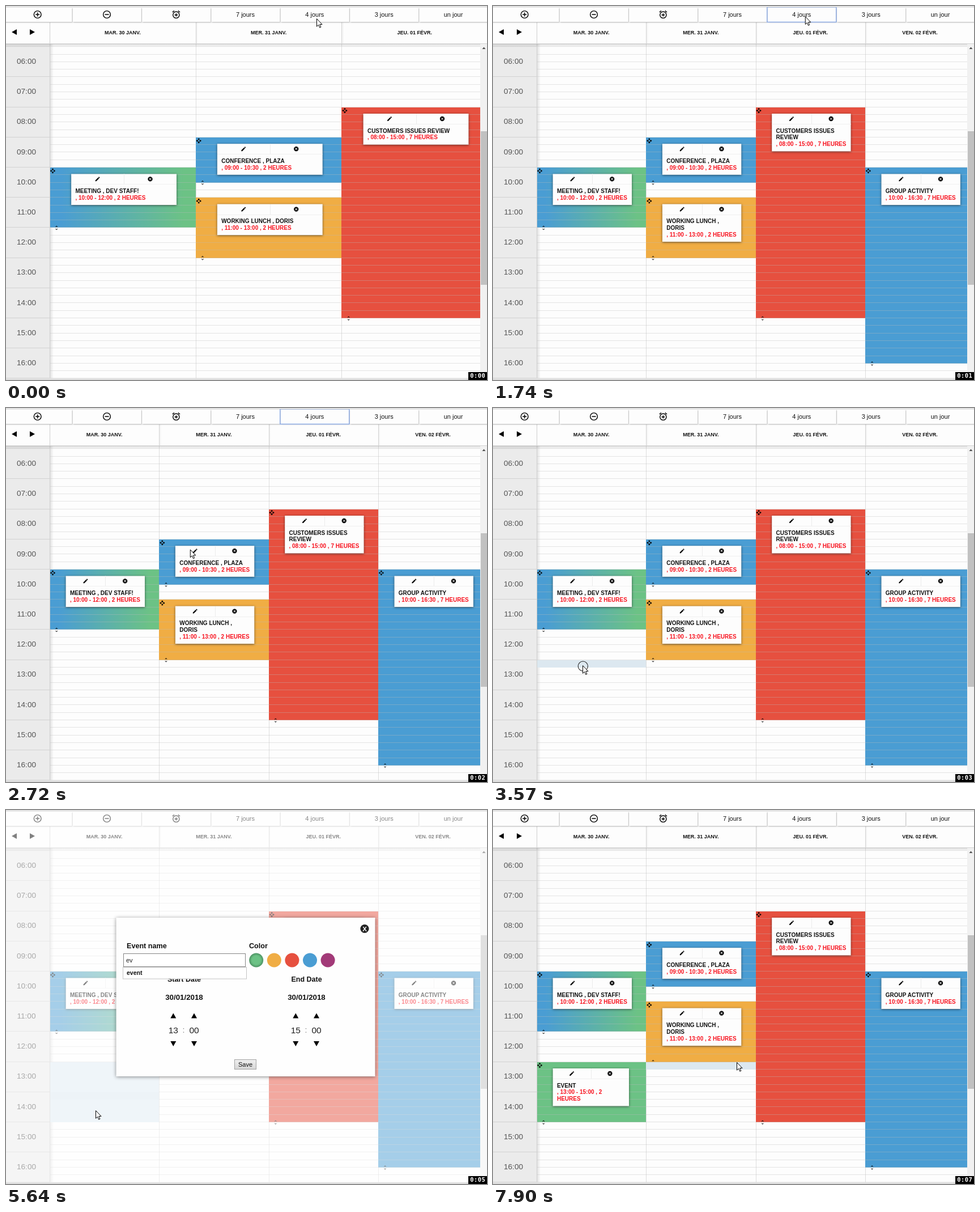
An HTML page for the animation above (7990 ms loop, 849 px wide and 660 px high).

```html
<!DOCTYPE html>
<html lang="fr">
<head>
<meta charset="utf-8">
<title>Agenda</title>
<style>
  html, body { margin: 0; width: 100%; height: 100%; overflow: hidden; background: #fdfdfd; }
  svg { display: block; width: 849px; height: 660px; font-family: "Liberation Sans", Arial, sans-serif; }
  text { white-space: pre; }
  .crisp { shape-rendering: crispEdges; }
  .b { font-weight: bold; }
  .mid { text-anchor: middle; }
  .card { filter: drop-shadow(0 1px 2px rgba(0, 0, 0, .55)); }
  .panel { filter: drop-shadow(0 1px 3px rgba(0, 0, 0, .45)); }
  .btn { filter: drop-shadow(1px 1px 1px rgba(0, 0, 0, .3)); }
  .late, #four, .wide #three { display: none; }
  .wide #four { display: inline; }
  .saved .late { display: inline; }
</style>
</head>
<body>
<svg id="stage" viewBox="0 0 849 660" xmlns="http://www.w3.org/2000/svg">
  <defs>
    <linearGradient id="mix"><stop offset=".08" stop-color="#4a9dd3"/><stop offset=".92" stop-color="#6cc285"/></linearGradient>
    <linearGradient id="key" x2="0" y2="1"><stop stop-color="#f0f0f0"/><stop offset="1" stop-color="#d6d6d6"/></linearGradient>
    <linearGradient id="edge"><stop stop-color="#000" stop-opacity=".12"/><stop offset="1" stop-color="#000" stop-opacity="0"/></linearGradient>
    <linearGradient id="under" x2="0" y2="1"><stop stop-color="#000" stop-opacity=".14"/><stop offset="1" stop-color="#000" stop-opacity="0"/></linearGradient>
    <radialGradient id="dot"><stop offset=".6" stop-color="#6cc285"/><stop offset="1" stop-color="#4c9263"/></radialGradient>
    <clipPath id="view"><rect y="67" width="837" height="590"/></clipPath>
  </defs>
</svg>
<script>
const LOOP = 7990, LEFT = 77, WIDTH = 773.2, TOP = 72.2, HOUR = 53.2, ROW = HOUR / 4;
const BLUE = '#4a9dd3', RED = '#e6503f', ORANGE = '#f0ad44', GREEN = '#6cc285';
const stage = document.getElementById('stage');
const yAt = hour => TOP + (hour - 6) * HOUR;

const rect = (x, y, w, h, fill, more = '') =>
  `<rect x="${x}" y="${y}" width="${w}" height="${h}" fill="${fill}" ${more}/>`;
const flat = (x, y, w, h, fill) => rect(x, y, w, h, fill, 'class="crisp"');
// One-pixel row that always lands on whole pixels
const rule = (x, y, w, fill) => flat(x, Math.round(y), w, 1, fill);
const text = (x, y, s, size, cls = '', fill = '#000', more = '') =>
  `<text x="${x}" y="${y}" font-size="${size}" class="${cls}" fill="${fill}" ${more}>${s}</text>`;
const poly = (points, fill = '#000') => `<polygon points="${points}" fill="${fill}"/>`;

const ICONS = {
  move: 'M10 9h4V6h3l-5-5-5 5h3zM9 10H6V7l-5 5 5 5v-3h3zM23 12l-5-5v3h-3v4h3v3zM14 15h-4v3H7l5 5 5-5h-3z',
  size: 'M12 5.8L15.2 9l1.4-1.4L12 3 7.4 7.6 8.8 9zM12 18.2L8.8 15l-1.4 1.4L12 21l4.6-4.6L15.2 15z',
  edit: 'M3 17.2V21h3.8L17.8 9.9l-3.7-3.7zM20.7 7c.4-.4.4-1 0-1.4l-2.3-2.3c-.4-.4-1-.4-1.4 0l-1.9 1.8 3.8 3.8z',
  cancel: 'M12 2a10 10 0 100 20 10 10 0 100-20zM17 15.6L15.6 17 12 13.4 8.4 17 7 15.6l3.6-3.6L7 8.4 8.4 7l3.6 3.6L15.6 7 17 8.4 13.4 12z',
  minus: 'M12 2a10 10 0 100 20 10 10 0 100-20zm0 2a8 8 0 110 16 8 8 0 110-16zM7 11h10v2H7z',
  plus: 'M12 2a10 10 0 100 20 10 10 0 100-20zm0 2a8 8 0 110 16 8 8 0 110-16zM7 11h4V7h2v4h4v2h-4v4h-2v-4H7z',
  alarm: 'M7.9 3.4L6.6 1.9 2 5.7l1.3 1.5zM22 5.7l-4.6-3.8-1.3 1.5 4.6 3.8zM12 4a9 9 0 100 18 9 9 0 100-18zm0 2a7 7 0 110 14 7 7 0 110-14zM8 12h3V9h2v3h3v2h-3v3h-2v-3H8z'
};
const icon = (name, x, y, size) =>
  `<path d="${ICONS[name]}" fill-rule="evenodd" transform="translate(${x - size / 2} ${y - size / 2}) scale(${size / 24})"/>`;

const events = [
  { col: 0, from: 10, to: 12, fill: 'url(#mix)', title: ['MEETING , DEV STAFF!'], when: [', 10:00 - 12:00 , 2 HEURES'] },
  { col: 1, from: 9, to: 10.5, fill: BLUE, title: ['CONFERENCE , PLAZA'], when: [', 09:00 - 10:30 , 2 HEURES'] },
  { col: 1, from: 11, to: 13, fill: ORANGE, title: ['WORKING LUNCH ,', 'DORIS'], when: [', 11:00 - 13:00 , 2 HEURES'] },
  { col: 2, from: 8, to: 15, fill: RED, title: ['CUSTOMERS ISSUES', 'REVIEW'], when: [', 08:00 - 15:00 , 7 HEURES'] },
  { col: 3, from: 10, to: 16.5, fill: BLUE, title: ['GROUP ACTIVITY'], when: [', 10:00 - 16:30 , 7 HEURES'] },
  { col: 0, from: 13, to: 15, fill: GREEN, title: ['EVENT'], when: [', 13:00 - 15:00 , 2', 'HEURES'], late: true }
];
const dayNames = ['MAR. 30 JANV.', 'MER. 31 JANV.', 'JEU. 01 FÉVR.', 'VEN. 02 FÉVR.'];

function card(e, x, y, colW, days) {
  const title = days === 3 ? [e.title.join(' ')] : e.title;
  const lines = [...title, ...e.when];
  const w = colW * .721 - (e.late ? 5 : 0), h = 31 + lines.length * 11.8;
  const cx = x + colW * .148, cy = y + 11.4;
  let s = rect(cx, cy, w, h, '#fdfdfd', 'class="card"');
  s += rule(cx, cy + 18, w, '#f0f0f0') + flat(cx + w / 2, cy, 1, 18, '#ececec');
  s += icon('edit', cx + w / 4, cy + 9, 10.5) + icon('cancel', cx + w * .75, cy + 9, 10);
  lines.forEach((line, i) => {
    s += text(cx + 7.3, cy + 33.5 + i * 11.8, line, 10, 'b', i < title.length ? '#111' : '#f8131f');
  });
  return s;
}

function calendar(id, days) {
  const w = WIDTH / days, shown = events.filter(e => e.col < days && !(e.late && days === 3));
  let head = '', cols = '', blocks = '', lines = '', tops = '';
  for (let d = 0; d < days; d++) {
    const x = LEFT + d * w;
    head += text(x + w / 2, 50, dayNames[d], 9, 'b mid', '#111');
    if (d) {
      head += flat(x, 29, 1, 37, '#d4d4d4') + rect(x + 1, 29, 3, 37, 'url(#edge)', 'opacity=".5"');
      cols += flat(x, 67, 1, 590, '#dedede');
    }
  }
  for (let y = TOP; y < 659; y += ROW) lines += rule(LEFT, y - 1, 760, 'rgba(186,186,186,.38)');
  for (const e of shown) {
    const x = LEFT + e.col * w, y = yAt(e.from), bottom = yAt(e.to), cls = e.late ? 'late' : '';
    blocks += `<g class="${cls}">${flat(x, y, w, bottom - y, e.fill)}</g>`;
    tops += `<g class="${cls}">${icon('move', x + 5.5, y + 6, 10)}${icon('size', x + 12.2, bottom + .2, 10)}${card(e, x, y, w, days)}</g>`;
  }
  return `<g id="${id}">${head}<g clip-path="url(#view)">${cols}${blocks}${lines}${tops}</g></g>`;
}

function frame() {
  let s = flat(0, 0, 849, 660, '#fdfdfd');
  s += flat(0, 67, 77, 590, '#ebebeb') + rect(77, 67, 7, 590, 'url(#edge)');
  for (let h = 6; h < 18; h++) s += rule(0, yAt(h) - 1, 77, '#d2d2d2');
  for (let h = 6; h < 17; h++) s += text(36, yAt(h) + 29.8, String(h).padStart(2, '0') + ':00', 13.6, 'mid', '#555');
  return s + poly('10,46 19,41 19,51') + poly('51,46 42,41 42,51');
}

function toolbar() {
  const labels = ['plus', 'minus', 'alarm', '7 jours', '4 jours', '3 jours', 'un jour'];
  let s = '';
  labels.forEach((label, i) => {
    const cx = 55.5 + i * 122.33;
    s += rect(cx - 60, 3, 121, 25, '#fdfdfd', 'class="btn"');
    s += i < 3 ? icon(label, cx + .2, 15, 17) : text(cx, 19, label, 11, 'mid', '#111');
  });
  return s;
}

function chrome() {
  return flat(77, 29, 1, 628, '#cfcfcf') + flat(0, 66, 849, 1, '#d2d2d2') + rect(0, 67, 837, 5, 'url(#under)') +
    flat(837, 67, 12, 590, '#f1f1f1') + flat(838, 221, 11, 271, '#c1c1c1') + poly('840.5,76 846.5,76 843.5,72.5', '#505050');
}

function timePick(cx, label, hour) {
  let s = text(cx, 302.5, label, 12.5, 'b mid', '#111') + text(cx, 335, '30/01/2018', 13.3, 'b mid', '#111');
  [[cx - 19.2, hour], [cx + 17.5, '00']].forEach(([x, n]) => {
    s += poly(`${x - 5},367.5 ${x + 5},367.5 ${x},358.5`) + poly(`${x - 5},408 ${x + 5},408 ${x},417`);
    s += text(x, 394, n, 15.5, 'mid', '#222');
  });
  return s + text(cx - 1, 393, ':', 14, 'mid', '#888');
}

function dialog() {
  let s = rect(194.5, 190, 457, 280, '#fefefe', 'class="panel"');
  s += '<circle cx="633" cy="209.5" r="7.6" fill="#222"/>' + text(633, 213.6, 'X', 11.5, 'b mid', '#fff');
  s += text(213, 243.5, 'Event name', 12.6, 'b', '#111') + text(429, 243.5, 'Color', 12.6, 'b', '#111');
  ['url(#dot)', ORANGE, RED, BLUE, '#a23a78'].forEach((c, i) => {
    s += `<circle cx="${441.7 + i * 31.6}" cy="265" r="12.5" fill="${c}"/>`;
  });
  s += timePick(314.5, 'Start Date', 13) + timePick(530.5, 'End Date', 15);
  s += rect(207.5, 253.5, 215, 23, '#fff', 'stroke="#858585"');
  s += text(212, 269, '', 11, '', '#222', 'id="typed"') + rect(0, 258, 1, 13, '#000', 'id="caret" class="crisp"');
  s += `<g id="hint">${rect(206.5, 277.5, 218, 20.5, '#fff', 'stroke="#c4c4c4"')}${text(213, 291, 'event', 10.5, 'b', '#111')}</g>`;
  return s + rect(403.5, 440.5, 38, 17, 'url(#key)', 'stroke="#a3a3a3"') + text(422.5, 452.8, 'Save', 11, 'mid', '#111');
}

stage.innerHTML += frame() + calendar('three', 3) + calendar('four', 4) +
  rect(0, 0, WIDTH / 4, 0, '#dfebf4', 'id="cells" class="crisp"') +
  rect(LEFT, yAt(14), WIDTH / 4, ROW, '#dbe8f0', 'id="shade" class="crisp"') +
  chrome() + toolbar() + rect(483.8, 1.8, 122, 26.6, 'none', 'id="focus" stroke="#8fade6" stroke-width="1.5"') +
  rect(0, 2, 849, 655.5, '#fff', 'id="veil"') +
  flat(0, 1, 849, 1, '#c4c4c4') + flat(0, 658, 849, 1, '#b5b5b5') +
  `<g id="dialog">${dialog()}</g>` +
  '<circle id="ring" r="8.6" fill="none" stroke="#222" stroke-width="1.1"/>' +
  '<path id="arrow" d="M.5 .5V14.2L3.6 11.3 5.7 16.2 7.8 15.3 5.8 10.5H10Z" fill="#fff" stroke="#000" stroke-width="1"/>' +
  flat(816, 646, 33, 14, '#000') +
  text(832.8, 656.3, '', 10.5, 'b mid', '#fff', 'id="clock" font-family="DejaVu Sans Mono, monospace" letter-spacing=".5"');

// Pointer path: time, x, y
const path = [
  [0, 548, 22], [400, 548, 22], [900, 551, 18], [1740, 551, 18], [2150, 465, 74], [2320, 449, 112],
  [2600, 372, 195], [2900, 255, 330], [3210, 158, 447], [3300, 158, 449], [3380, 158, 454], [3570, 158, 454],
  [4310, 156, 546], [4410, 156, 547], [4590, 156, 547], [4760, 158, 530], [6750, 158, 530], [7500, 430, 445], [LOOP, 430, 445]
];
const ticks = [900, 1950, 2960, 3990, 5060, 6150, 7050];
const keys = [5060, 5160, 5930, 6150, 6330];
const clicks = [[1570, 1660], [3570, 3680], [4410, 4590], [7550, 7640]];
const carets = [[5160, 5640], [5930, 6800], [7330, 7550]];

const ids = ['cells', 'shade', 'focus', 'veil', 'dialog', 'typed', 'caret', 'hint', 'ring', 'arrow', 'clock'];
const el = Object.fromEntries(ids.map(id => [id, document.getElementById(id)]));
const show = (node, on) => { node.style.display = on ? 'inline' : 'none'; };
const set = (node, attrs) => { for (const k in attrs) node.setAttribute(k, attrs[k]); };
const within = (spans, t) => spans.some(([a, b]) => t >= a && t < b);
const passed = (times, t) => times.filter(x => x <= t).length;
const ramp = (t, a, b) => Math.min(1, Math.max(0, (t - a) / (b - a)));

function pointer(t) {
  const i = path.findIndex(p => p[0] > t), [a, b] = [path[i - 1], path[i]];
  const k = (t - a[0]) / (b[0] - a[0]);
  return [a[1] + (b[1] - a[1]) * k, a[2] + (b[2] - a[2]) * k];
}

function markCells(t, x, y) {
  const w = WIDTH / 4, dragging = t >= 3570 && t < 7640;
  let col = Math.floor((x - LEFT) / w), top = TOP + Math.floor((y - TOP) / ROW) * ROW;
  let bottom = top + ROW, on = t >= 2200;
  if (dragging) {
    col = 0;
    top = yAt(13);
    bottom = t < 4410 ? Math.max(bottom, top + ROW) : yAt(15);
  } else {
    on = on && !events.some(e => e.col === col && (!e.late || t >= 7640) && top + 1 > yAt(e.from) && top + 1 < yAt(e.to));
  }
  show(el.cells, on);
  show(el.shade, dragging && bottom > yAt(14) + 1);
  set(el.cells, { x: LEFT + col * w, y: top, height: bottom - top, fill: dragging && t > 3680 ? '#dfebf4' : '#dce8f0' });
}

function draw(t) {
  const [x, y] = pointer(t), open = t >= 4600 && t < 7640;
  stage.classList.toggle('wide', t >= 1740);
  stage.classList.toggle('saved', t >= 7640);
  set(el.arrow, { transform: `translate(${x} ${y})` });
  set(el.ring, { cx: x + .8, cy: y + 1.5 });
  show(el.ring, within(clicks, t));
  show(el.focus, t >= 1570 && t < 3570);
  markCells(t, x, y);

  set(el.veil, { opacity: .5 * (ramp(t, 4590, 4760) - ramp(t, 7600, 7880)) });
  set(el.dialog, { opacity: ramp(t, 4590, 4760) });
  show(el.dialog, open);
  el.typed.textContent = 'event'.slice(0, passed(keys, t));
  if (open) set(el.caret, { x: Math.round(212 + el.typed.getComputedTextLength()) });
  show(el.caret, within(carets, t));
  show(el.hint, t >= 5060 && t < 7500);
  el.clock.textContent = '0:0' + passed(ticks, t);
}

const start = performance.now();
(function loop() {
  draw((performance.now() - start) % LOOP);
  requestAnimationFrame(loop);
})();
</script>
</body>
</html>
```
